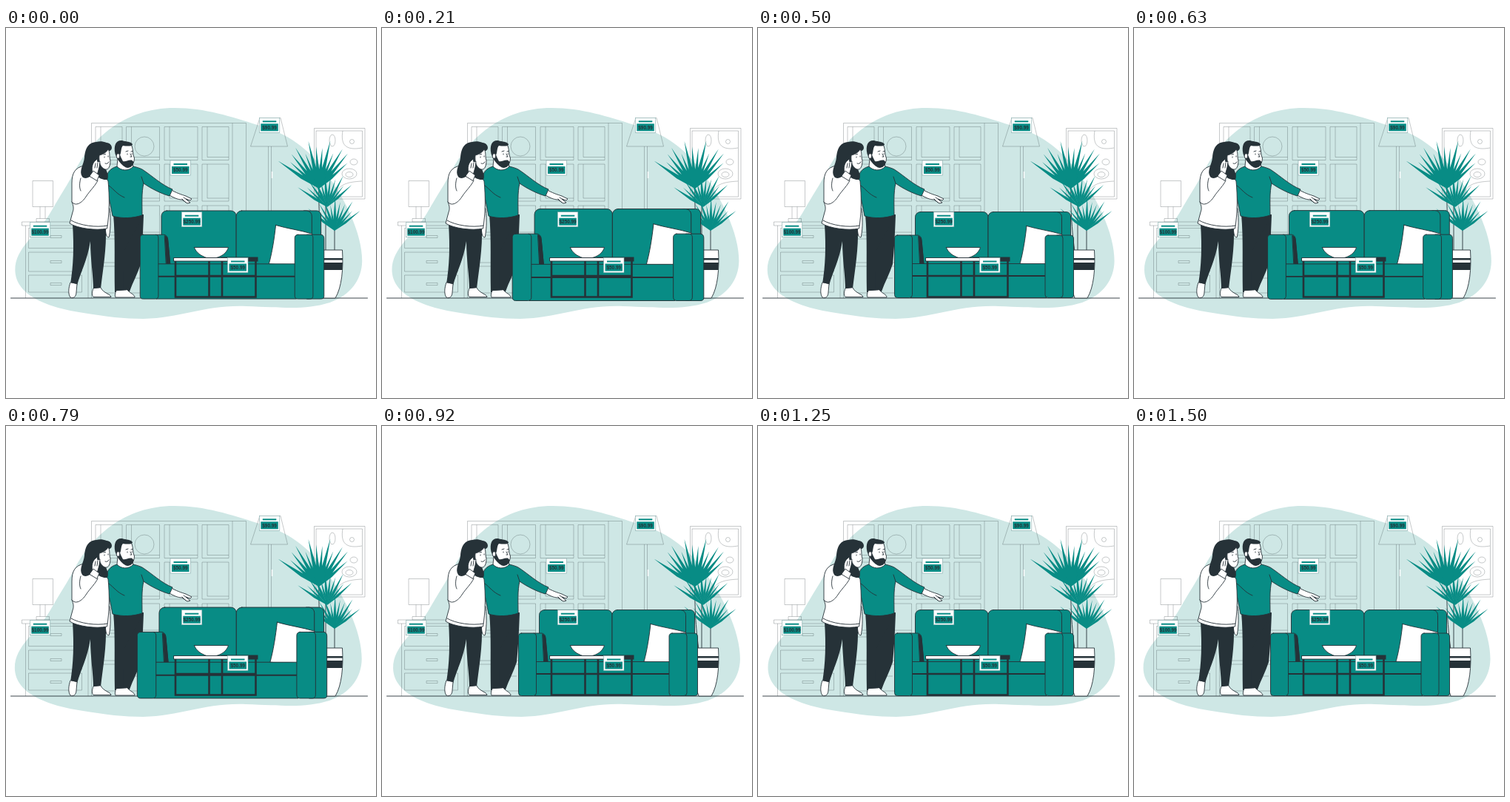
These frames come from a looping animation (500 px wide and 500 px high, 1.54 s). An HTML page:

```html
<!DOCTYPE html>
<html lang="en">
<head>
<meta charset="utf-8">
<title>Furniture shop</title>
<style>
  html, body { margin: 0; width: 100%; height: 100%; overflow: hidden; background: #fff; }
  svg { display: block; width: 100vw; height: 100vh; }
  .thin { fill: none; stroke: #263238; stroke-opacity: .38; stroke-width: .7; }
  .ink { stroke: #263238; stroke-width: .9; stroke-linejoin: round; stroke-linecap: round; }
  .white { fill: #fff; }
  .teal { fill: #088c85; }
  .dark { fill: #263238; }
  .none { fill: none; }
  text { font: bold 6.4px "Liberation Sans", Arial, sans-serif; text-anchor: middle; fill: #263238; }
</style>
</head>
<body>
<svg viewBox="0 0 500 500">
  <path id="blob" fill="#cee7e5" d="M228 108C160 108 116 150 94 192C84 211 73 227 60 250C42 280 12.600 297 12.600 327C13 362 58 378 105 385C135 390 160 393 186 393C238 392 268 374 325 376C380 378 405 381 438 371C467 360 481 340 481.500 315C482 278 457 226 428 190C408 163 383 143 340 131C305 120 270 108 228 108Z"/>

  <g class="thin">
    <g id="shelf">
      <path d="M115.500 365V128.500H324.500V365M306 128.500V365"/>
      <circle cx="187" cy="160" r="13"/>
      <path d="M121 285h86v32h-86zM121 322h86v36h-86zM168 338h14"/>
    </g>
    <!-- dresser with lamp -->
    <path d="M21.500 262h94v5h-94zM26.500 267v98M111 267v98"/>
    <path d="M30.500 270.500h72v27h-72zM30.500 303h72v26h-72zM30.500 334h72v23h-72z"/>
    <path d="M60 280.500h15v3h-15zM60 314.500h15v3h-15zM60 344.500h15v3h-15z"/>
    <path d="M36 206.500h27.500v35H36zM46 241.500v16M53 241.500v16M41 257.500h17.500v4.500H41z"/>
    <!-- floor lamp -->
    <path d="M343 121.500h28l9.500 38.500h-50zM354.500 160v100M358.500 160v100"/>
    <path d="M359.500 194v9" stroke="#fff" stroke-width="1.500" stroke-opacity="1"/>
    <!-- wall picture -->
    <path d="M416.500 135.500h68.500v95.500h-68.500zM419 139h62.500v89H419z"/>
    <ellipse cx="441" cy="152" rx="4" ry="8"/>
    <circle cx="467.500" cy="153.500" r="3"/>
    <ellipse cx="470" cy="181" rx="5" ry="4"/>
    <ellipse cx="464" cy="197" rx="10" ry="7"/>
    <ellipse cx="464" cy="198" rx="5" ry="3.500"/>
    <path d="M446 228C447 212 460 208 481 207M455 139C452 158 459 166 481 162"/>
  </g>

  <path class="ink" d="M6.500 365H488.500"/>

  <!-- plant -->
  <g>
    <path class="ink none" stroke-width="1.500" d="M423 210C422 250 425 280 428 302M432 238V302M444 270V302"/>
    <path class="ink white" d="M420 300H454.500C456 325 454 350 445 365H428C421 345 419 322 420 300Z"/>
    <path class="dark" d="M420 311h35v2.500h-35zM420 317h35l-.8 10H420z"/>
    <g id="leaves" class="teal"></g>
  </g>

  <!-- man -->
  <g>
    <path class="dark" d="M145 252C148 285 146 320 147 357H165L168 325L178 290L186 252Z"/>
    <path class="dark" d="M160 300L186 252C185 280 184 300 182 319C178 332 171 344 167 356H158Z"/>
    <path class="ink white" d="M149 355C147 359 147 362 148 364H174C174 360 168 359 164 354Z"/>
    <path class="ink white" d="M133 240L140 244C142 262 141 275 139 283C135 283 134 275 134 265Z"/>
    <path class="ink white" d="M222 218C230 223 237 225 243 227L251 231L249 233L243 231L249 236L245 237L238 232C232 232 226 229 221 226Z"/>
    <path class="ink none" d="M238 231L243 236M240 229L246 233"/>
    <path class="ink teal" d="M150 187C140 190 136 195 136 206C137 222 141 238 144 254C157 258 172 257 184 253C184 238 183 222 186 210C196 217 210 224 221 227L225 218C210 212 198 200 184 191C180 189 176 188 172 187Z"/>
    <path class="ink none" d="M186 210L183 201M139 213C146 218 150 225 160 229"/>
    <path class="ink white" d="M151 176L150 187C155 193 166 194 172 187L169 178Z"/>
    <path class="ink white" d="M150 165C151 157 160 156 170 159C172 165 171 171 173.500 176C173 184 170 187 164 187C156 186 151 178 150 165Z"/>
    <path class="dark" d="M147.500 170C145 158 149 151 157 152C163 154 168 153 171 157C171 160 164 160 158 159C155 162 156 168 154 172L158 180C162 181 164 178 170 178.500L172.500 181C172 187 167 190 162 188.500C157 186 153 181 150 176Z"/>
    <ellipse class="ink white" cx="151.500" cy="173" rx="2.300" ry="3.300"/>
    <path class="ink none" d="M162 167l3-1M169 167l2-.5M168 170l2 4h-2M164 170v1M170 170v.5"/>
  </g>

  <!-- woman -->
  <g>
    <path class="dark" d="M90 265C92 297 91 320 87 346L96 348C101 329 110 314 114 288C114 313 118 335 118 354L128 352C131 325 136 300 135 267Z"/>
    <path class="ink white" d="M87 344C84 352 84 360 87 364C91 366 95 363 95 357L96 346Z"/>
    <path class="ink white" d="M118 352C116 357 116 361 118 363.500H142C141 359 132 359 128 351Z"/>
    <path class="ink white" d="M105 186C93 189 89 196 89 210L89 235C91 240 92 244 90 249L86 264C97 271 122 274 136.500 271C140 250 140 228 138 207C134 199 127 196 122 196Z"/>
    <path class="ink none" d="M89 235C94 242 103 236 108 228C114 219 121 213 124 206M88 260C100 267 122 270 137 267M101 203C99 210 99 216 101 220"/>
    <path class="dark" d="M122 154C110 155 107 164 106 175C105 185 98 193 103 201C108 206 113 200 118 199C124 200 129 206 137 205C140 199 135 193 134 187L138 166C145 167 145 156 136 155C131 153 126 153 122 154Z"/>
    <path class="ink white" d="M126 172C130 171 135 169 138 164C141 168 139 173 141 179C141 186 139 192 134 191C128 189 125 182 126 172Z"/>
    <path class="ink none" d="M132 171l2.500-.5M133 174v1M138 173v1M134 183C136 184 138 183 139 181"/>
    <path class="ink white" d="M117 196C115 189 117 182 121 179L123 177L124 181L127 180L126 188C125 192 124 196 122 201Z"/>
    <path class="ink none" d="M121 183L120 189M124 182L123 189"/>
    <path class="ink white" d="M113 200L118 193L126 199L123 206Z"/>
    <path class="dark" d="M125 191C130 190 136 197 135 204L127 203Z"/>
  </g>

  <!-- sofa -->
  <g id="sofa" class="ink teal">
    <path d="M400 248.500H416C420 248.500 422.500 251 422.500 255V320H400Z"/>
    <rect x="212.500" y="248.500" width="98.500" height="78" rx="7"/>
    <rect x="311" y="248.500" width="99.500" height="78" rx="7"/>
    <path class="white" d="M363 267.500C378 272 395 274 411 279C402 291 395 305 389 320C377 318 366 320 354 318.500C358 304 361 286 363 267.500Z"/>
    <path d="M205 280H215C219 280 221 283 221 287L224 319H205Z"/>
    <path class="dark" d="M217 281.500C221 282 221 287 221.500 292L224 319H219Z"/>
    <path d="M206 318.500H390V364.500H206Z"/>
    <path class="none" stroke-width="1.800" d="M206 335H390"/>
    <rect x="184.500" y="280" width="24" height="84.500" rx="4"/>
    <path d="M404 280H422C425 280 426.500 282 426.500 285V361C426.500 363.500 425 364.500 422 364.500H404Z"/>
    <rect x="388" y="280" width="24" height="84.500" rx="4"/>
  </g>

  <!-- tables and bowl -->
  <g>
    <path class="none" stroke="#263238" stroke-width="2.600" d="M229 315V363.500H274.500V315M292 315V363.500H337.500V315M274 363.500H292M229 335H337"/>
    <path class="dark" d="M290 309.500H340.500V315.500H290Z"/>
    <path class="ink white" d="M227 310.500H301V315H227Z"/>
    <path class="ink white" d="M254.500 296.500H300.500C298 305 290 309 284 310.500H271C264 308 257 304 254.500 296.500Z"/>
  </g>

  <g id="tags"></g>
</svg>

<script>
  const $ = id => document.getElementById(id);
  const rad = Math.PI / 180;

  // Shelf compartments: outer box and an inner depth line
  let cells = '';
  for (const [x, w] of [[121, 36], [162.5, 45], [214, 45], [265, 36]])
    for (const [y, h] of [[133.5, 45], [184, 50], [240, 40]])
      cells += `<path d="M${x} ${y}h${w}v${h}h${-w}zM${x + 7} ${y}v${h - 4}h${w - 7}"/>`;
  $('shelf').innerHTML += cells;

  // Fan of slim pointed leaves around a base point
  function fan(x, y, r, n, from, to) {
    let d = '';
    for (let i = 0; i < n; i++) {
      const a = (from + (to - from) * i / (n - 1)) * rad;
      const len = r * (.88 + .12 * Math.cos(i * 2.4));
      const at = (s, off) => `${(x + Math.cos(a + off) * len * s).toFixed(1)} ${(y + Math.sin(a + off) * len * s).toFixed(1)}`;
      d += `M${x} ${y}L${at(.42, -.09)}L${at(1, 0)}L${at(.42, .09)}Z`;
    }
    return `<path d="${d}"/>`;
  }
  $('leaves').innerHTML =
    fan(423, 217, 67, 13, -146, -42) +
    fan(434, 242, 48, 11, -146, -42) +
    fan(444, 274, 47, 11, -140, -38);

  const tag = (x, y, price) => `<g transform="translate(${x} ${y})">
    <rect class="white" stroke="#7fa9a8" stroke-width=".6" width="27.5" height="20"/>
    <rect class="teal" x="4.500" y="4" width="18.500" height="2"/>
    <rect class="teal" x="2" y="8" width="23.500" height="10"/>
    <text x="13.800" y="15.400">${price}</text></g>`;
  $('tags').innerHTML =
    tag(237.3, 248.7, '$250.99') +
    tag(222, 179, '$50.99') +
    tag(342.3, 121.3, '$90.99') +
    tag(32.3, 262.7, '$100.99') +
    tag(299.5, 310.5, '$50.99');

  const loop = 1540, steps = 37;
  const beat = [0, 1, .5, 0, 0, 1, 0, 0, 0, 0, 0];
  const shake = [0, -1, 2, -4, 4, -4, 4, -3.2, 2, -1, 0];

  // Linear blend between values spaced a tenth of the loop apart
  function mix(list, p) {
    const i = Math.floor(p * 10);
    return list[i] + (list[i + 1] - list[i]) * (p * 10 - i);
  }

  function draw(now) {
    const step = Math.floor((now % loop + 4) / loop * steps);
    const p = (step + 1) % steps / steps;
    const scale = 1 + .1 * mix(beat, p);
    $('sofa').setAttribute('transform', `translate(305.5 306.7) scale(${scale}) translate(-305.5 -306.7)`);
    $('blob').setAttribute('transform', `translate(${mix(shake, p)})`);
    requestAnimationFrame(draw);
  }
  draw(performance.now());
</script>
</body>
</html>
```
